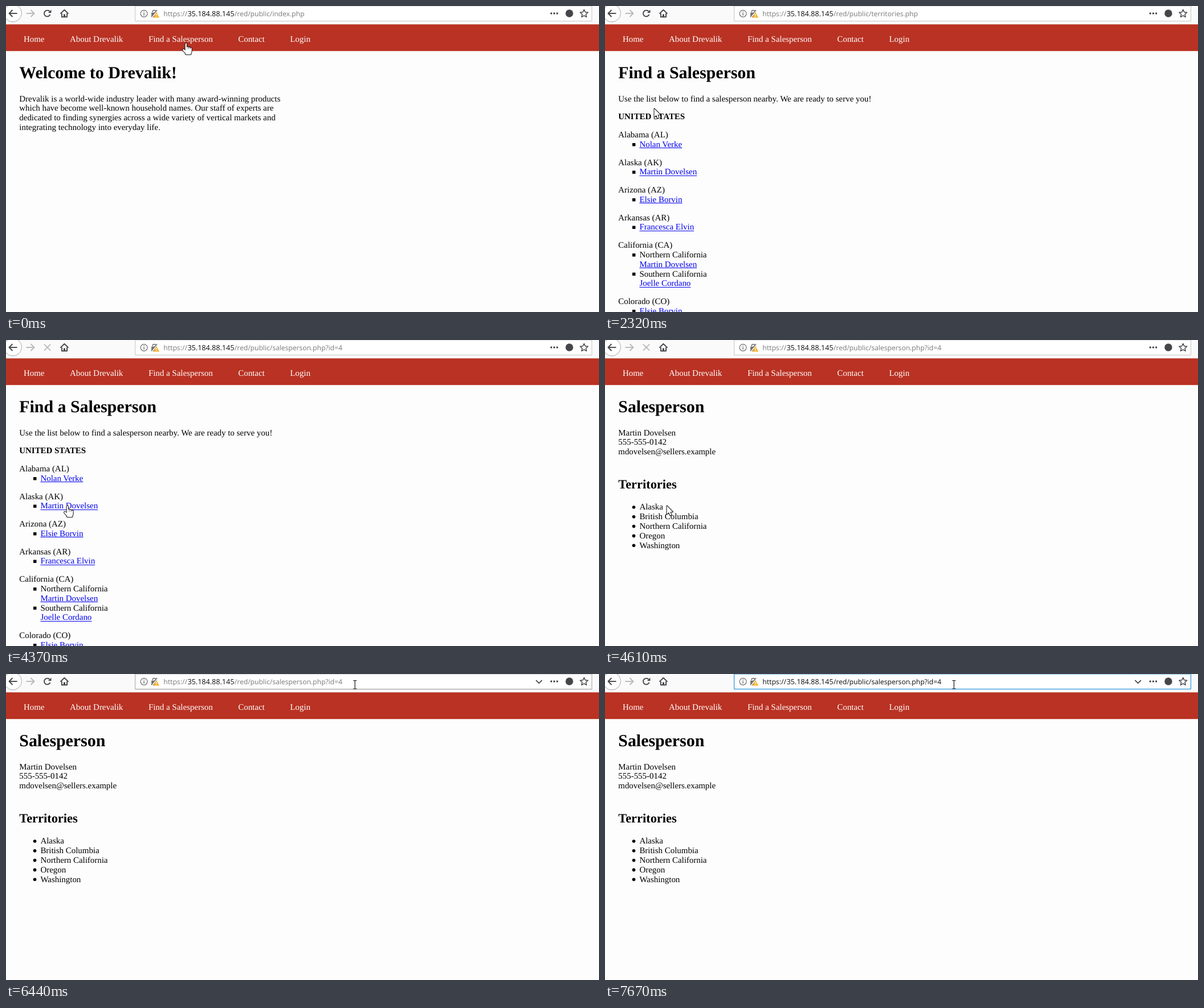
Animation of 1040 by 538 pixels, one loop 8 s. Source, as an HTML page with a canvas:

```html
<!DOCTYPE html>
<html lang="en">
<head>
<meta charset="utf-8">
<title>Sales directory</title>
<style>
html, body { margin: 0; width: 100%; height: 100%; overflow: hidden; background: #fdfdfd; }
canvas { display: block; width: 1040px; height: 538px; }
</style>
</head>
<body>
<canvas id="stage" width="1040" height="538"></canvas>
<script>
const ctx = document.getElementById('stage').getContext('2d');
const LOOP = 8000, STEP = 135;
const SCALE = 14 / 15, EM = 16 * SCALE, LINE = 18 * SCALE;
const LEFT = 23.3, INDENT = 60.4, MID = 13;
const SERIF = '"Liberation Serif", "Times New Roman", serif';
const SANS = '"Open Sans", "Noto Sans", sans-serif';
const DARK = '#45454a', GREY = '#707074', PALE = '#b9b9bb';
ctx.textRendering = 'geometricPrecision';
ctx.lineJoin = 'round';

// Each move eases the pointer to x, y in jumps of about STEP ms.
const moves = [
  { from: 295, to: 430, x: 334, y: 57 },
  { from: 1235, to: 1890, x: 81, y: 180 },
  { from: 2185, to: 2320, x: 86, y: 180 },
  { from: 2320, to: 2600, x: 163, y: 212 },
  { from: 2600, to: 2770, x: 121, y: 226 },
  { from: 2905, to: 3310, x: 117, y: 241 },
  { from: 3310, to: 4090, x: 108, y: 291 },
  { from: 5485, to: 6440, x: 612, y: 18 }
];

let hotspots = [];

function text(str, x, y, { size = EM, weight = '', color = '#000', face = SERIF } = {}) {
  ctx.font = `${weight} ${size}px ${face}`;
  ctx.fillStyle = color;
  ctx.fillText(str, x, y);
  return ctx.measureText(str).width;
}

function box(color, x, y, w, h) {
  ctx.fillStyle = color;
  ctx.fillRect(x, y, w, h);
}

function line(color, width, ...points) {
  ctx.strokeStyle = color;
  ctx.lineWidth = width;
  ctx.beginPath();
  points.forEach(([x, y]) => ctx.lineTo(x, y));
  ctx.stroke();
}

function shape(color, ...points) {
  ctx.fillStyle = color;
  ctx.beginPath();
  points.forEach(([x, y]) => ctx.lineTo(x, y));
  ctx.fill();
}

function dot(x, y, r, color) {
  ctx.fillStyle = color;
  ctx.beginPath();
  ctx.arc(x, y, r, 0, 2 * Math.PI);
  ctx.fill();
}

function ring(x, y, r, color, width = 1, from = 0, to = 2 * Math.PI) {
  ctx.strokeStyle = color;
  ctx.lineWidth = width;
  ctx.beginPath();
  ctx.arc(x, y, r, from, to);
  ctx.stroke();
}

function hotspot(x, baseline, w) {
  hotspots.push({ x, y: baseline - 12, w, h: 16 });
}

function link(str, x, y) {
  const color = '#00e', w = text(str, x, y, { color });
  box(color, x, Math.ceil(y + 1), w, 1);
  hotspot(x, y, w);
}

function heading(str) {
  text(str, LEFT, 127, { size: 2 * EM, weight: 'bold' });
}

function paragraph(...lines) {
  lines.forEach((str, i) => text(str, LEFT, 167.6 + i * LINE));
}

function welcomePage() {
  heading('Welcome to Drevalik!');
  paragraph(
    'Drevalik is a world-wide industry leader with many award-winning products',
    'which have become well-known household names. Our staff of experts are',
    'dedicated to finding synergies across a wide variety of vertical markets and',
    'integrating technology into everyday life.'
  );
}

const states = [
  ['Alabama (AL)', ['', 'Nolan Verke']],
  ['Alaska (AK)', ['', 'Martin Dovelsen']],
  ['Arizona (AZ)', ['', 'Elsie Borvin']],
  ['Arkansas (AR)', ['', 'Francesca Elvin']],
  ['California (CA)', ['Northern California', 'Martin Dovelsen'], ['Southern California', 'Joelle Cordano']],
  ['Colorado (CO)', ['', 'Elsie Borvin']]
];

function territoriesPage() {
  heading('Find a Salesperson');
  paragraph('Use the list below to find a salesperson nearby. We are ready to serve you!');
  text('UNITED STATES', LEFT, 199.2, { weight: 'bold' });
  let y = 231;
  for (const [state, ...areas] of states) {
    text(state, LEFT, y);
    for (const [area, person] of areas) {
      y += LINE;
      box('#000', 48, y - 6.8, 5.4, 5.4);
      if (area) {
        text(area, INDENT, y);
        y += LINE;
      }
      link(person, INDENT, y);
    }
    y += LINE + EM;
  }
}

function salespersonPage() {
  heading('Salesperson');
  paragraph('Martin Dovelsen', '555-555-0142', 'mdovelsen@sellers.example');
  text('Territories', LEFT, 260.8, { size: 1.5 * EM, weight: 'bold' });
  ['Alaska', 'British Columbia', 'Northern California', 'Oregon', 'Washington'].forEach((name, i) => {
    const y = 298.3 + i * LINE;
    dot(50.5, y - 4.3, 2.8, '#000');
    text(name, INDENT, y);
  });
}

function navBar() {
  box('#b93223', 0, 32.3, 1040, 46.9);
  let x = 31;
  for (const label of ['Home', 'About Drevalik', 'Find a Salesperson', 'Contact', 'Login']) {
    const w = text(label, x, 62.6, { color: '#fff' });
    hotspot(x, 62.6, w);
    x += w + 44.6;
  }
}

// Horizontal arrow; dir is 1 for right and -1 for left.
function arrowIcon(x, dir, color) {
  const tip = x + 7 * dir, neck = tip - 6 * dir;
  line(color, 1.9, [x - 7 * dir, MID], [tip, MID]);
  line(color, 1.9, [neck, MID - 6], [tip, MID], [neck, MID + 6]);
}

function stopIcon(x, r) {
  for (const d of [r, -r]) line(PALE, 1.8, [x - r, MID - d], [x + r, MID + d]);
}

function reloadIcon(x) {
  ring(x, MID, 5.4, DARK, 1.9, 0.35, 5.5);
  shape(DARK, [x + 7, MID - 6.5], [x + 7, MID - 1], [x + 1.5, MID - 1]);
}

function homeIcon(x) {
  line(DARK, 1.9, [x - 7, MID + 0.6], [x, MID - 6.2], [x + 7, MID + 0.6]);
  line(DARK, 1.9, [x - 4.6, MID], [x - 4.6, MID + 6.2], [x + 4.6, MID + 6.2], [x + 4.6, MID]);
  box(DARK, x - 1.5, MID + 1.5, 3, 5);
}

function infoIcon(x) {
  ring(x, MID + 0.3, 6, GREY, 1.2);
  box(GREY, x - 0.7, MID - 0.7, 1.4, 4.4);
  box(GREY, x - 0.7, MID - 3.4, 1.4, 1.6);
}

function lockIcon(x) {
  ring(x, MID - 2.5, 3, GREY, 1.6, Math.PI, 2 * Math.PI);
  box(GREY, x - 5, MID - 1.5, 10, 8.3);
  line('#fff', 2.2, [x - 4, MID + 6.5], [x + 6, MID - 5]);
  line(GREY, 1.4, [x - 5, MID + 6], [x + 5, MID - 6]);
  const peak = x + 3.7;
  shape('#f5b32d', [peak, MID - 2.5], [peak + 5.3, MID + 7.5], [peak - 5.3, MID + 7.5]);
  box('#fff', peak - 0.6, MID + 0.8, 1.2, 3.4);
  box('#fff', peak - 0.6, MID + 5, 1.2, 1.2);
}

function starIcon(x) {
  ctx.beginPath();
  for (let i = 0; i < 10; i++) {
    const r = i % 2 ? 3.4 : 7.3, a = (i / 5 - 0.5) * Math.PI;
    ctx.lineTo(x + r * Math.cos(a), MID + 0.5 + r * Math.sin(a));
  }
  ctx.closePath();
  ctx.strokeStyle = DARK;
  ctx.lineWidth = 1.5;
  ctx.stroke();
}

function navButtons(loading) {
  dot(12, 12.5, 15.5, '#fff');
  ring(12, 12.5, 15.5, '#aaaaac');
  arrowIcon(12.5, -1, DARK);
  arrowIcon(42.5, 1, PALE);
  if (loading) stopIcon(72.5, 5.7);
  else reloadIcon(72.4);
  homeIcon(102.4);
}

function urlBar(t, path) {
  const hover = t >= 6300, focus = t >= 6710;
  const selected = t >= 6830 && t < 7390;
  box('#fff', 226, 0, 802, 27);
  if (hover && !focus) box('#e4e4e5', 227, 27, 801, 1);
  ctx.strokeStyle = focus ? '#0a84d8' : hover ? '#a4a4a6' : '#c6c6c8';
  ctx.lineWidth = 1;
  ctx.strokeRect(226.5, 0, 801, 26.5);

  infoIcon(242);
  lockIcon(260);
  if (hover) line(DARK, 1.7, [929.5, 10.8], [934.8, 16.2], [940.1, 10.8]);
  for (const d of [-5.2, 0, 5.2]) dot(961.5 + d, MID, 1.7, DARK);
  dot(988, MID, 6.7, DARK);
  starIcon(1013.8);

  if (selected) box('#0078d7', 276, 5, 316, 16);
  const strong = selected ? '#fff' : '#0c0c0d';
  const soft = focus ? strong : '#78787a';
  const part = (str, x, size, color) => text(str, x, 18.4, { size, color, face: SANS });
  part('https://', 276.3, 12.2, soft);
  part('35.184.88.145', 318.4, 12.6, strong);
  part('/red/public/' + path, 400.8, 12.1, soft);
  if (t >= 7390 && t < 7670) box('#000', 591, 5, 1, 16);
}

function pointerAt(t) {
  let x = 316, y = 65;
  for (const move of moves) {
    if (t < move.from) break;
    const span = move.to - move.from, steps = Math.round(span / STEP);
    const k = Math.min(1, Math.floor((t - move.from) / span * steps) / steps);
    const eased = k * k * (3 - 2 * k);
    x += (move.x - x) * eased;
    y += (move.y - y) * eased;
  }
  return [x, y];
}

function handPath() {
  const path = new Path2D();
  path.ellipse(-3, 14, 1.5, 4, -0.7, 0, 2 * Math.PI);
  path.roundRect(-1.5, 0.5, 2.4, 14, 1.2);
  for (let i = 1; i < 4; i++) path.roundRect(3 * i - 1.8, 6 + i * 0.8, 2.4, 8, 1.2);
  path.roundRect(-1.5, 11, 10.2, 9.3, 2);
  return path;
}

const hand = handPath();
const arrow = new Path2D('M.5 .5V15.2L4 12L6.3 17.6L8.6 16.6L6.3 11.2H11Z');

function textCursor(x) {
  line('#111', 1.2, [x, 12], [x, 25.5]);
  for (const y of [11.5, 26]) line('#111', 1, [x - 3, y], [x + 3, y]);
}

function pointer(t) {
  const [x, y] = pointerAt(t);
  if (x > 226 && y < 27) return textCursor(x);
  const onLink = hotspots.some(s => x >= s.x && x <= s.x + s.w && y >= s.y && y <= s.y + s.h);
  const path = onLink ? hand : arrow;
  ctx.save();
  ctx.translate(x, y);
  ctx.strokeStyle = '#111';
  ctx.lineWidth = 2;
  ctx.stroke(path);
  ctx.fillStyle = '#fff';
  ctx.fill(path);
  ctx.restore();
}

function draw(t) {
  const within = (from, to) => t >= from && t < to;
  hotspots = [];
  box('#fdfdfd', 0, 0, 1040, 538);
  box('#fafafb', 0, 0, 1040, 33);
  navButtons(within(830, 1890) || within(4370, 5350));
  urlBar(t, t < 830 ? 'index.php' : t < 4370 ? 'territories.php' : 'salesperson.php?id=4');
  navBar();
  if (t < 960) welcomePage();
  else if (t < 4490) territoriesPage();
  else salespersonPage();
  pointer(t);
}

const start = performance.now();
function tick() {
  draw((performance.now() - start) % LOOP);
  requestAnimationFrame(tick);
}
tick();
</script>
</body>
</html>
```
